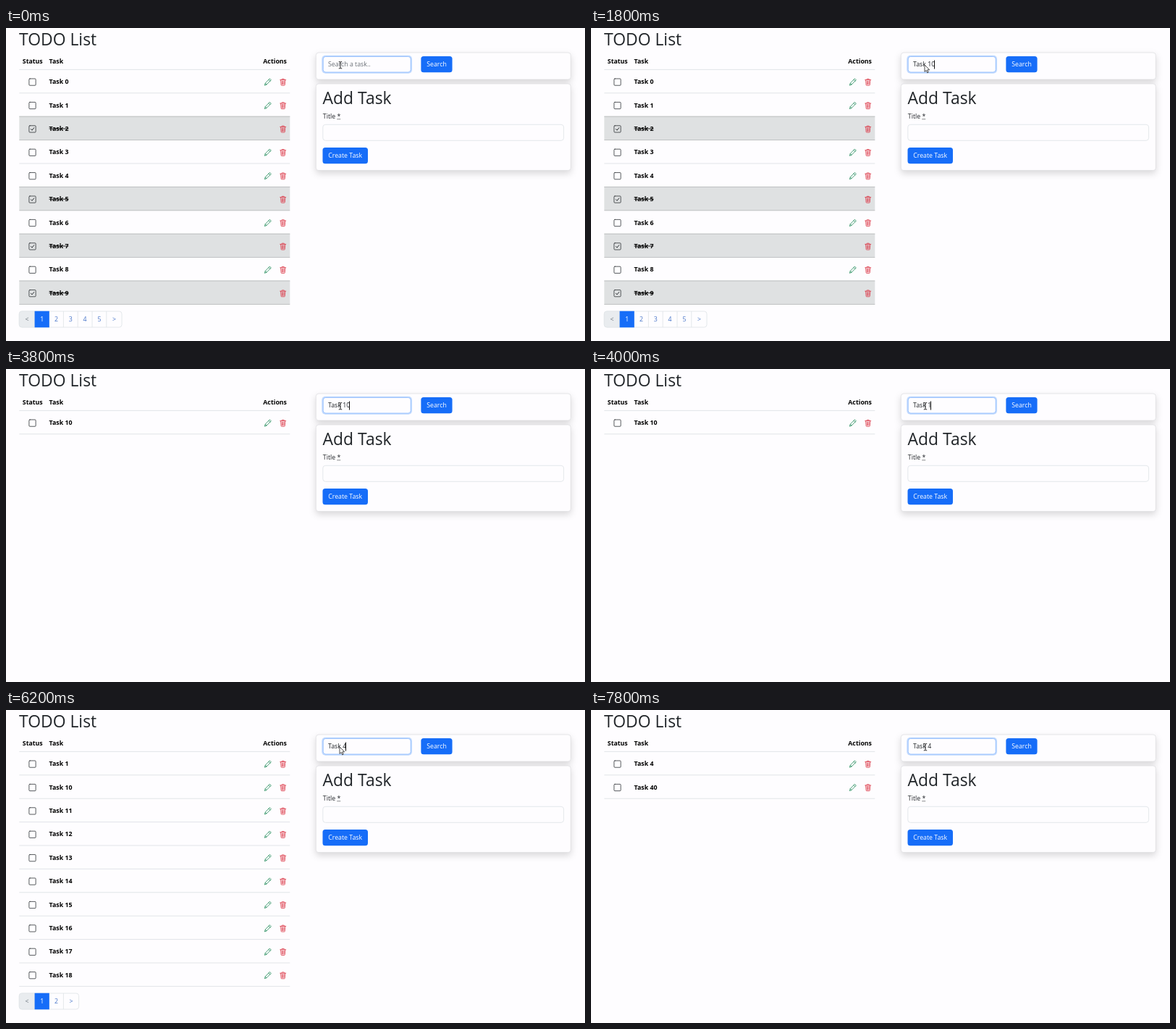
An HTML page that plays this animation: 800x432 px, repeating every 8000 ms.

```html
<!DOCTYPE html>
<html lang="en">
<head>
<meta charset="utf-8">
<title>TODO List</title>
<style>
  html, body { margin: 0; width: 100%; height: 100%; overflow: hidden; background: #fefdff; }
  svg { display: block; width: 800px; height: 432px; }
  text { font: 8.8px "Open Sans", "Noto Sans", sans-serif; fill: #212529; white-space: pre; }
  .h { font-size: 22.9px; }
  .b { font-weight: 700; fill: #000; }
  .done { text-decoration: line-through; }
  .mid { text-anchor: middle; }
  .on { fill: #fff; }
  .link { fill: #4a76c9; }
  .off { fill: #6c757d; }
  .hint { fill: #6b7177; }
  .card { fill: #fefdff; stroke: #dcdcdf; stroke-width: .7; filter: drop-shadow(0 4.8px 4.8px rgba(0, 0, 0, .15)); }
  .field { fill: #fefdff; stroke: #dee2e6; stroke-width: .8; }
  .btn { fill: #166df8; }
  .icon { fill: none; stroke-width: 1.25; stroke-linejoin: round; stroke-linecap: round; }
</style>
</head>
<body>
<svg viewBox="0 0 800 432">
  <defs>
    <g id="box" class="icon" stroke="#2b2f33"><rect x=".6" y=".6" width="14.8" height="14.8" rx="1.8"/></g>
    <g id="checked" class="icon" stroke="#2b2f33"><use href="#box"/><path d="M4.6 8.2 7.2 10.8 11.4 5.4" stroke-width="1.6"/></g>
    <g id="pencil" class="icon" stroke="#198754">
      <path d="M12.5 .8 15.2 3.5 5 13.7 .8 15.2 2.3 11ZM10.2 3.1 12.9 5.8M2.5 11 5 13.5"/>
    </g>
    <g id="trash" class="icon" stroke="#dc3545">
      <path d="M1.6 3.2H14.4M5.5 3V1.2H10.5V3M3 3.4 3.9 14.4Q4 15.4 5 15.4H11Q12 15.4 12.1 14.4L13 3.4M5.6 5.5 5.9 13M8 5.5V13M10.4 5.5 10.1 13"/>
    </g>
  </defs>

  <text class="h" x="18" y="24">TODO List</text>
  <text class="b" x="22.8" y="49">Status</text>
  <text class="b" x="59.6" y="49">Task</text>
  <text class="b" x="388" y="49" text-anchor="end">Actions</text>
  <g id="lists"></g>

  <rect class="card" x="428.3" y="34" width="352" height="37" rx="3.6"/>
  <rect x="436.3" y="37.7" width="124.8" height="25" rx="5" fill="#c3dbfe"/>
  <rect class="field" x="438.2" y="39.4" width="121" height="21.6" rx="3.6" style="stroke:#86b7fe"/>
  <text id="query" x="445" y="53.3"></text>
  <path id="caret" d="M0 44.5V56.5" stroke="#111"/>
  <rect class="btn" x="573.4" y="39" width="43.2" height="22.3" rx="3.6"/>
  <text class="on mid" x="595" y="53.3">Search</text>

  <rect class="card" x="428.3" y="77" width="352" height="119.6" rx="3.6"/>
  <text class="h" x="437.6" y="105">Add Task</text>
  <text x="437.8" y="125">Title *</text>
  <path d="M457.5 125.8H462" stroke="#212529" stroke-width=".8" stroke-dasharray="1.2 .6"/>
  <rect class="field" x="437.8" y="133.3" width="332.8" height="22" rx="3.6"/>
  <rect class="btn" x="437.5" y="165" width="62.5" height="22.3" rx="3.6"/>
  <text class="on mid" x="468.7" y="179.4">Create Task</text>

  <path id="beam" d="M459.8 46.6H461.4L462 47.2 462.6 46.6H464.2M462 47V55.4M459.8 55.8H461.4L462 55.2 462.6 55.8H464.2" fill="none" stroke="#111" stroke-width=".9"/>
  <path id="arrow" d="M461 50.8V60.4L463.2 58.4 464.7 61.8 466.2 61.1 464.7 57.8H467.7Z" fill="#fff" stroke="#222" stroke-width=".8"/>
</svg>
<script>
  const LOOP = 8000, TOP = 57.4, PITCH = 32.4;
  const $ = id => document.getElementById(id);
  const show = (el, on) => { el.style.visibility = on ? 'visible' : 'hidden'; };

  const icon = (name, x, y) => `<use href="#${name}" transform="translate(${x - 5} ${y - 5}) scale(.625)"/>`;
  const rule = (y, color) => `<path d="M18.3 ${y}H392.3" stroke="${color}" stroke-width=".9"/>`;

  function row(n, i, done) {
    const y = TOP + PITCH * i, mid = y + 17.2;
    const fill = done ? `<rect x="18.3" y="${y}" width="374" height="${PITCH}" fill="#dfe1e2"/>` + rule(y, '#b9bbbd') : '';
    return fill + rule(y + PITCH, done ? '#b9bbbd' : '#dee2e6')
      + icon(done ? 'checked' : 'box', 36.5, mid)
      + `<text class="b ${done ? 'done' : ''}" x="59.6" y="${mid + 2.6}">Task ${n}</text>`
      + (done ? '' : icon('pencil', 361.8, mid))
      + icon('trash', 382.7, mid);
  }

  function pager(pages) {
    const edge = i => i ? 39.8 + 19.8 * (i - 1) : 18.3;
    const end = edge(pages + 1) + 21.2;
    let out = `<rect class="field" x="18.3" y="391" width="${end - 18.3}" height="22" rx="3.6"/>`
      + '<path d="M39.8 391H21.9Q18.3 391 18.3 394.6V409.4Q18.3 413 21.9 413H39.8Z" fill="#e9ecef" stroke="#dee2e6" stroke-width=".7"/>';
    for (let i = 2; i <= pages + 1; i++) out += `<path d="M${edge(i)} 391V413" stroke="#dee2e6" stroke-width=".8"/>`;
    out += '<rect class="btn" x="39.6" y="390.7" width="20.2" height="22.6"/>';
    for (let i = 0; i <= pages + 1; i++) {
      const x = (edge(i) + (i > pages ? end : edge(i + 1))) / 2;
      const label = i === 0 ? '&lt;' : i > pages ? '&gt;' : i;
      out += `<text class="mid ${['off', 'on'][i] || 'link'}" x="${x}" y="405.3">${label}</text>`;
    }
    return out;
  }

  const list = (tasks, done, pages) => '<g>' + rule(TOP, '#dee2e6')
    + tasks.map((n, i) => row(n, i, done.includes(n))).join('') + (pages ? pager(pages) : '') + '</g>';

  $('lists').innerHTML = list([0, 1, 2, 3, 4, 5, 6, 7, 8, 9], [2, 5, 7, 9], 5)
    + list([10], [], 0)
    + list([1, 10, 11, 12, 13, 14, 15, 16, 17, 18], [], 2)
    + list([4, 40], [], 0);
  const lists = [...$('lists').children];

  // Each track holds [start time, value] steps.
  const typed = [[0, ''], [400, 'T'], [600, 'Ta'], [800, 'Tas'], [1000, 'Task'], [1200, 'Task '],
    [1400, 'Task 1'], [1600, 'Task 10'], [4000, 'Task 1'], [5400, 'Task '], [5800, 'Task 4']];
  const shown = [[0, 0], [2000, 1], [4600, 2], [6400, 3]];
  const loading = [[0, false], [1800, true], [2000, false], [4400, true], [4600, false], [6200, true], [6400, false]];
  const caretOn = [[0, false], [400, true], [4600, false], [5400, true], [6800, false]];
  const at = (track, t) => track.findLast(step => step[0] <= t)[1];

  function draw(now) {
    const t = now % LOOP, text = at(typed, t), query = $('query'), busy = at(loading, t);
    query.textContent = text || 'Search a task..';
    query.setAttribute('class', text ? '' : 'hint');
    $('caret').setAttribute('transform', `translate(${Math.round(445 + query.getComputedTextLength()) - .5} 0)`);
    show($('caret'), at(caretOn, t));
    lists.forEach((el, i) => show(el, i === at(shown, t)));
    show($('arrow'), busy);
    show($('beam'), !busy);
  }

  const start = performance.now();
  function tick() {
    draw(performance.now() - start);
    requestAnimationFrame(tick);
  }
  tick();
</script>
</body>
</html>
```
